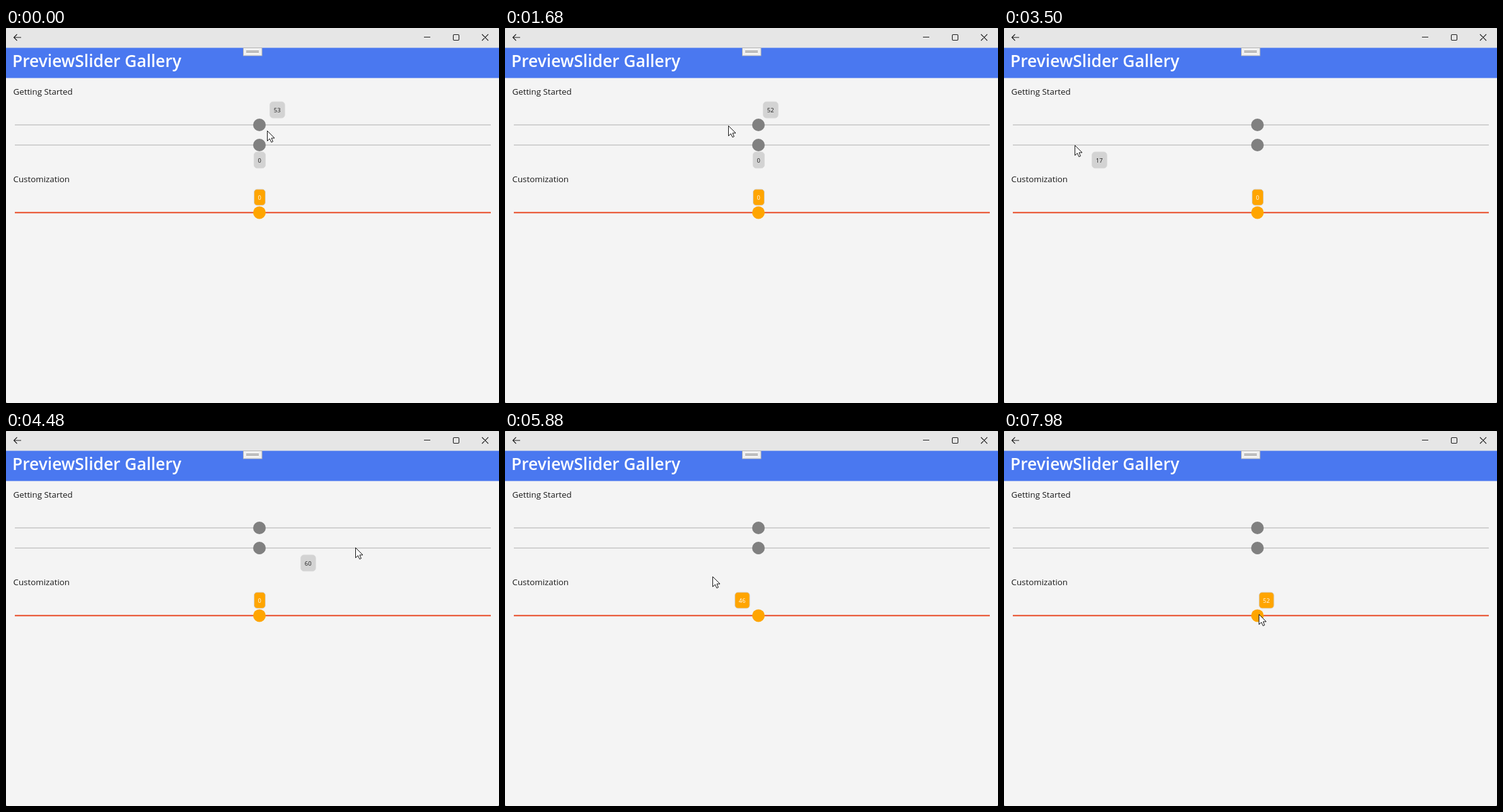
Write an HTML page that moves like this. It is 782 by 596 pixels and loops after 8000 ms.

```html
<!DOCTYPE html>
<html lang="en">
<head>
<meta charset="utf-8">
<title>PreviewSlider Gallery</title>
<style>
  html, body { margin: 0; width: 100%; height: 100%; overflow: hidden; background: #777; }
  svg { display: block; width: 782px; height: 596px; font-family: "Open Sans", "Noto Sans", sans-serif; }
  .icon { fill: none; stroke: #1a1a1a; stroke-width: 1.1; }
  .label { font-size: 13.35px; fill: #1a1a1a; }
  .bubble text { font-size: 9.4px; text-anchor: middle; }
</style>
</head>
<body>
<svg viewBox="0 0 782 596">
  <rect width="782" height="596" rx="2" fill="#f4f4f4"/>
  <path d="M0 32V2Q0 0 2 0H780Q782 0 782 2V32z" fill="#e6e6e6"/>
  <rect y="31.5" width="782" height="48" fill="#4a78f0"/>
  <path class="icon" d="M24 15H12.5M17.5 10L12.5 15L17.5 20M663 14.5H673M755 10L765 20M765 10L755 20"/>
  <rect class="icon" x="709.5" y="10.5" width="9" height="9" rx="1.5"/>
  <rect x="376.5" y="31.5" width="29.5" height="12.5" fill="#f0f0f0" stroke="#b4b4b4"/>
  <path d="M381 36.5H401M381 38.5H401" stroke="#8c8c8c"/>
  <text x="10" y="62" font-size="26.35" font-weight="600" fill="#fff">PreviewSlider Gallery</text>
  <text class="label" x="11.5" y="106">Getting Started</text>
  <text class="label" x="11.5" y="245">Customization</text>
  <g id="sliders"></g>
  <path id="cursor" d="M.5 .5V16.5L4.3 13L6.9 18.6L9.4 17.5L7 12H12z" fill="#fff" stroke="#111"/>
</svg>
<script>
const STEP = 70, LOOP = 8000, LAG = 140;

// Turning points of the pointer: [time, position]
const xKeys = [
  [-140, 418], [280, 404], [1190, 618], [1540, 409], [1680, 354], [2450, 155],
  [3220, 155], [3360, 139], [3550, 108], [3920, 274], [4340, 467], [4480, 554],
  [4760, 644], [5040, 589], [5180, 546], [5600, 370], [5740, 364], [6370, 138],
  [6650, 138], [6930, 368], [7070, 368], [7700, 410], [7840, 404]
];
const yKeys = [
  [0, 163], [1680, 155], [2660, 157], [3010, 186], [4480, 185], [5180, 181],
  [5600, 278], [5810, 228], [6370, 288], [6650, 288], [7280, 292], [7840, 291]
];

// Each slider owns the preview from its start time until the next one takes over
const grey = { track: "#d0d0d0", thumb: "#808080", fill: "#d3d3d3", ink: "#1a1a1a" };
const orange = { track: "#e8451f", thumb: "#ffa500", fill: "#ffa500", ink: "#fff" };
const sliders = [
  { ...grey, y: 154, top: 117.3, from: 0, to: 2870 },
  { ...grey, y: 186, top: 197, from: 2870, to: 5460 },
  { ...orange, y: 293.4, top: 256.2, from: 5460, to: LOOP }
];

const $ = id => document.getElementById(id);

$("sliders").innerHTML = sliders.map(s => `
  <rect x="14" y="${s.y - 1}" width="755" height="2" fill="${s.track}"/>
  <circle cx="402" cy="${s.y}" r="10" fill="${s.thumb}"/>
  <g class="bubble">
    <rect y="${s.top}" height="25.7" rx="5" fill="${s.fill}" stroke="#d8d8d8"/>
    <text y="${s.top + 16.7}" fill="${s.ink}"></text>
  </g>`).join("");
const bubbles = document.querySelectorAll(".bubble");

// Monotone Hermite curve through the keys, at rest at every turning point
function curve(keys, t) {
  const last = keys.length - 1;
  if (t <= keys[0][0]) return keys[0][1];
  if (t >= keys[last][0]) return keys[last][1];
  const rate = i => (keys[i + 1][1] - keys[i][1]) / (keys[i + 1][0] - keys[i][0]);
  const slope = i => {
    if (i === 0 || i === last) return 0;
    const a = rate(i - 1), b = rate(i);
    return a * b > 0 ? 2 * a * b / (a + b) : 0;
  };
  const i = keys.findIndex(k => k[0] > t) - 1;
  const [t0, p] = keys[i], [t1, q] = keys[i + 1];
  const h = t1 - t0, u = (t - t0) / h, v = 1 - u;
  return p + (q - p) * u * u * (3 - 2 * u) + h * u * v * (v * slope(i) - u * slope(i + 1));
}

function placeBubble(bubble, x, value) {
  const [box, text] = bubble.children, width = value > 9 ? 23.5 : 18;
  box.setAttribute("x", x + .4 - width / 2);
  box.setAttribute("width", width);
  text.setAttribute("x", x + .2);
  text.textContent = value;
}

function draw(t) {
  const x = Math.round(curve(xKeys, t)), y = Math.round(curve(yKeys, t));
  $("cursor").setAttribute("transform", `translate(${x} ${y})`);
  const preview = Math.round(curve(xKeys, t - LAG)) + 12;
  sliders.forEach((s, i) => {
    bubbles[i].style.display = t < s.to ? "" : "none";
    if (t < s.from) placeBubble(bubbles[i], 402, 0);
    else placeBubble(bubbles[i], preview, Math.floor((preview - 18) / 7.63));
  });
}

function tick() {
  const t = performance.now() % LOOP;
  draw(Math.floor(t / STEP) * STEP);
  requestAnimationFrame(tick);
}
tick();
</script>
</body>
</html>
```
